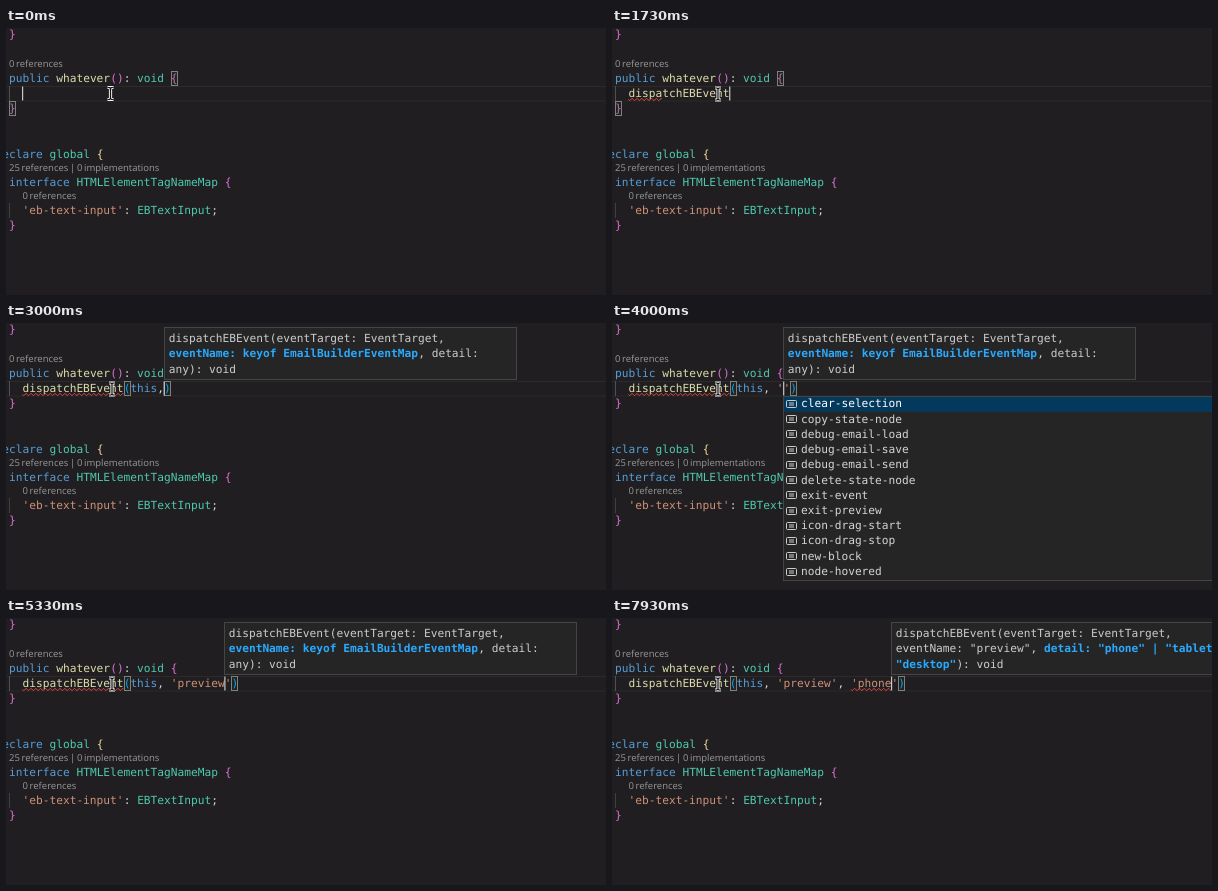
An HTML page with a canvas for the animation above (8000 ms loop, 600 px wide and 267 px high).

```html
<!DOCTYPE html>
<html lang="en">
<head>
<meta charset="utf-8">
<title>Typed event completion</title>
<style>
html, body { margin: 0; width: 100%; height: 100%; overflow: hidden; background: #201e20; }
canvas { display: block; }
</style>
</head>
<body>
<canvas id="stage" width="600" height="267"></canvas>
<script>
const ctx = document.getElementById('stage').getContext('2d');
ctx.textRendering = 'geometricPrecision';

const LOOP = 8000, CHAR = 6.743, ROW = 15.2, LEFT = 16.5, LINE = 65.6;
const MONO = '11.2px "DejaVu Sans Mono", monospace';
const LENS = '9.5px "Open Sans", "Noto Sans", sans-serif';
const BLUE = '#569cd6', TEAL = '#4ec9b0', YELLOW = '#dcdcaa', STRING = '#ce9178',
  PLAIN = '#d4d4d4', PURPLE = '#da70d6', GOLD = '#f0d898', CALL = '#179fff',
  VARIABLE = '#9cdcfe', ACCENT = '#2aaaff', PANEL = '#252526', BORDER = '#454545';

// [time, text of the edited line, characters right of the caret]
const edits = [
  [0, '', 0], [270, 'd', 0], [470, 'di', 0], [670, 'dis', 0], [800, 'disp', 0],
  [1000, 'dispa', 0], [1670, 'dispatchEBEvent', 0], [2000, '()', 1],
  [2330, '(t)', 1], [2470, '(th)', 1], [2600, '(thi)', 1], [2730, '(this)', 1],
  [2930, '(this,)', 1], [3330, '(this, )', 1], [3730, "(this, '')", 2],
  [4600, "(this, 'p')", 2], [4800, "(this, 'pr')", 2], [4930, "(this, 'pre')", 2],
  [5200, "(this, 'preview')", 2], [5470, "(this, 'preview')", 1],
  [5670, "(this, 'preview',)", 1], [5870, "(this, 'preview', )", 1],
  [6530, "(this, 'preview', '')", 2], [7070, "(this, 'preview', 'p')", 2],
  [7230, "(this, 'preview', 'ph')", 2], [7400, "(this, 'preview', 'phone')", 2]
];

const names = ['dispatchEBEvent', 'dispatchEvent', 'document', 'default', 'delete', 'debugger',
  'decodeURI', 'decodeURIComponent', 'devicePixelRatio', 'declare', 'do', 'Document'];
const words = ['this', 'throw', 'true', 'try', 'type', 'typeof', 'top', 'toolbar', 'toString',
  'Text', 'TextDecoder', 'TextEncoder'];
const events = ['clear-selection', 'copy-state-node', 'debug-email-load', 'debug-email-save',
  'debug-email-send', 'delete-state-node', 'exit-event', 'exit-preview', 'icon-drag-start',
  'icon-drag-stop', 'new-block', 'node-hovered'];

// [from, to, left edge, items, icon colour]
const lists = [
  [400, 1070, 16, names, '#b180d7'],
  [1070, 1670, 16, names.slice(0, 9), '#b180d7'],
  [2400, 2870, 124, words, '#cccccc'],
  [3800, 4670, 171, events, '#cccccc'],
  [4670, 5200, 171, ['preview', 'exit-preview'], '#cccccc'],
  [6600, 7130, 238, ['desktop', 'phone', 'tablet'], '#cccccc'],
  [7130, 7400, 238, ['phone'], '#cccccc']
];

// [from, to, first column, last column]
const errors = [[1070, 1930, 0, 5], [1930, 7600, 0, 15], [7600, LOOP, 33, 39]];

// Bold parts are wrapped in asterisks.
const hints = [
  ['dispatchEBEvent(*eventTarget: EventTarget*,', 'eventName: keyof EmailBuilderEventMap, detail:', 'any): void'],
  ['dispatchEBEvent(eventTarget: EventTarget,', '*eventName: keyof EmailBuilderEventMap*, detail:', 'any): void'],
  ['dispatchEBEvent(eventTarget: EventTarget,', 'eventName: "preview", *detail: "phone" | "tablet" |*', '*"desktop"*): void']
];

const colX = col => LEFT + col * CHAR;
const during = ([from, to], t) => t >= from && t < to;

function text(str, x, middle, color, font = MONO) {
  ctx.font = font;
  ctx.wordSpacing = font === LENS ? '-0.8px' : '0px';
  ctx.fillStyle = color;
  ctx.fillText(str, x, middle + 3.4);
}

function code(x, middle, ...parts) {
  for (const [str, color, font] of parts) {
    text(str, x, middle, color, font);
    x += str.length * CHAR;
  }
}

function rect(x, y, w, h, color) {
  ctx.fillStyle = color;
  ctx.fillRect(x, y, w, h);
}

function frame(x, y, w, h, color) {
  ctx.strokeStyle = color;
  ctx.lineWidth = 1;
  ctx.strokeRect(x + .5, y + .5, w - 1, h - 1);
}

function bracketBox(x, middle) {
  const left = Math.round(x - .1), top = Math.round(middle - 7.6);
  rect(left, top, 7, 15, 'rgba(0,100,0,.1)');
  frame(left, top, 7, 15, '#808080');
}

function scenery() {
  rect(0, 0, 600, 267, '#201e20');
  rect(0, 58, 600, 1, '#2b2b2b');
  rect(0, 72.5, 600, 1, '#2b2b2b');
  rect(3, 58, 1, 15, '#505050');
  rect(3, 175, 1, 15, '#404040');
  code(3, 6.4, ['}', PURPLE]);
  text('0 references', 3, 35.6, '#999999', LENS);
  code(3, 50.2, ['public ', BLUE], ['whatever', YELLOW], ['()', PURPLE], [': ', PLAIN],
    ['void ', TEAL], ['{', PURPLE]);
  code(3, 80.8, ['}', PURPLE]);
  code(3 - 2 * CHAR, 126.4, ['declare ', BLUE], ['global ', TEAL], ['{', GOLD]);
  text('25 references | 0 implementations', 3, 139.8, '#999999', LENS);
  code(3, 154.4, ['interface ', BLUE], ['HTMLElementTagNameMap ', TEAL], ['{', PURPLE]);
  text('0 references', LEFT, 168, '#999999', LENS);
  code(LEFT, 182.6, ["'eb-text-input'", STRING], [': ', PLAIN], ['EBTextInput', TEAL], [';', PLAIN]);
  code(3, 197.8, ['}', PURPLE]);
}

function tokenColor(token) {
  if (token[0] === "'") return STRING;
  if (token === 'this') return BLUE;
  if (token === 'dispatchEBEvent') return YELLOW;
  if (/[()]/.test(token)) return CALL;
  return /\w/.test(token) ? VARIABLE : PLAIN;
}

function squiggle(from, to) {
  ctx.beginPath();
  for (let x = from; x <= to; x += .5) ctx.lineTo(x, 71.5 + Math.sin((x - from) * 1.3));
  ctx.strokeStyle = '#f14c4c';
  ctx.lineWidth = 1;
  ctx.stroke();
}

function hintBox(x, rows) {
  rect(x, 4, 353, 53, PANEL);
  frame(x, 4, 353, 53, BORDER);
  rows.forEach((row, i) => code(x + 4.7, 15.8 + i * ROW, ...row.split('*').map((part, j) =>
    j % 2 ? [part, ACCENT, 'bold ' + MONO] : [part, '#cccccc'])));
}

function icon(x, middle, color) {
  ctx.strokeStyle = color;
  ctx.lineWidth = 1;
  ctx.beginPath();
  ctx.roundRect(x + .5, middle - 3.5, 10, 7, 1);
  ctx.stroke();
  rect(x + 3, middle - 1.5, 5, 1, color);
  rect(x + 3, middle + .5, 5, 1, color);
}

function suggestions([, , x, items, color], word) {
  const height = items.length * 15.23 + 2;
  rect(x, 73, 600, height, PANEL);
  rect(x + 1, 73.5, 600, 15.2, '#04395e');
  frame(x, 73, 600, Math.round(height), BORDER);
  items.forEach((item, i) => {
    const middle = 81 + i * 15.23;
    const n = item.startsWith(word) ? word.length : 0;
    icon(x + 3, Math.round(middle), color);
    code(x + 18, middle, [item.slice(0, n), ACCENT, 'bold ' + MONO],
      [item.slice(n), i ? PLAIN : '#ffffff']);
  });
}

function pointer(x, y) {
  const beam = new Path2D(`M${x - 3} ${y - 6}h2l1 1l1-1h2M${x} ${y - 5}v10M${x - 3} ${y + 6}h2l1-1l1 1h2`);
  for (const [width, color] of [[3.2, '#f0f0f0'], [1.2, '#111111']]) {
    ctx.lineWidth = width;
    ctx.strokeStyle = color;
    ctx.stroke(beam);
  }
}

function draw(t) {
  const [, typed, back] = edits.findLast(edit => edit[0] <= t);
  const called = typed.startsWith('(');
  const line = called ? 'dispatchEBEvent' + typed : typed;
  const caret = line.length - back;
  const before = line.slice(0, caret);

  scenery();
  if (called) {
    bracketBox(colX(15), LINE);
    bracketBox(colX(line.length - 1), LINE);
  } else {
    bracketBox(3 + 24 * CHAR, 50.4);
    bracketBox(3, 80.8);
  }
  const tokens = line.match(/'[^']*'|\w+|[()]|[^\w()']+/g) || [];
  code(LEFT, LINE, ...tokens.map(token => [token, tokenColor(token)]));
  for (const error of errors)
    if (during(error, t)) squiggle(colX(error[2]), colX(error[3]));
  rect(colX(caret) - .5, 58.5, 1.2, 14, '#c8c8c6');

  if (t >= 2070) hintBox(Math.floor(colX(caret)), hints[before.split(',').length - 1]);
  const list = lists.find(entry => during(entry, t));
  if (list) suggestions(list, before.match(/\w*$/)[0]);
  if (t < 70) pointer(104.5, 65.5);
  else pointer(106, 66);
}

const start = performance.now();
function tick() {
  draw((performance.now() - start) % LOOP);
  requestAnimationFrame(tick);
}
tick();
</script>
</body>
</html>
```
